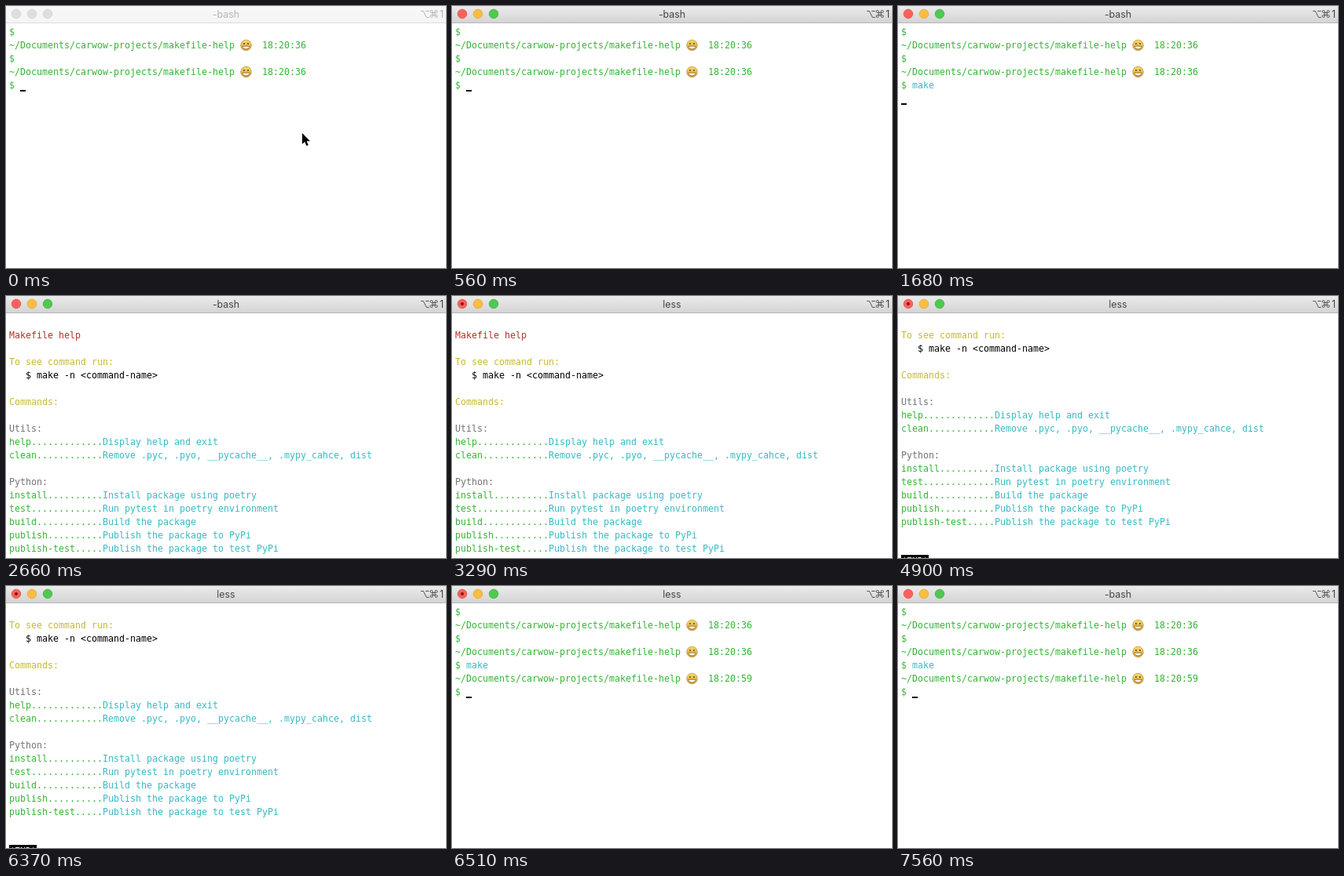
An HTML page with a canvas that plays this animation: 560x334 px, repeating every 7630 ms.

```html
<!DOCTYPE html>
<html>
<head>
<meta charset="utf-8">
<style>
  html, body { margin: 0; width: 100%; height: 100%; overflow: hidden; background: #fff; }
  canvas { display: block; width: 560px; height: 334px; }
</style>
</head>
<body>
<canvas id="stage"></canvas>
<script>
const W = 560, H = 334, LOOP = 7630, CELL = 7, ROW = 17;
const GREEN = '#35b535', CYAN = '#38bac4', YELLOW = '#c6ba35', RED = '#ab3526', GRAY = '#747474';
const MONO = '11.63px "DejaVu Sans Mono", monospace';
const UI = '12.4px Inter, sans-serif';

// Event times in ms
const ACTIVE = 70, POINTER_OFF = 140, KEYS = [910, 980, 1120, 1190], ENTER = 1540,
  PAGER = 2660, TITLE_ON = 3220, SCROLLS = [4340, 4760], QUIT = 6440, TITLE_OFF = 6860;

const PAGE = [
  [], ['Makefile help', RED], [],
  ['To see command run:', YELLOW], ['   $ make -n <command-name>', '#000'], [],
  ['Commands:', YELLOW], [],
  ['Utils:', GRAY],
  ['help', GREEN, 'Display help and exit'],
  ['clean', GREEN, 'Remove .pyc, .pyo, __pycache__, .mypy_cahce, dist'], [],
  ['Python:', GRAY],
  ['install', GREEN, 'Install package using poetry'],
  ['test', GREEN, 'Run pytest in poetry environment'],
  ['build', GREEN, 'Build the package'],
  ['publish', GREEN, 'Publish the package to PyPi'],
  ['publish-test', GREEN, 'Publish the package to test PyPi']
];

const canvas = document.getElementById('stage');
const ratio = window.devicePixelRatio || 1;
canvas.width = W * ratio;
canvas.height = H * ratio;
const c = canvas.getContext('2d');
c.scale(ratio, ratio);

const passed = (times, t) => times.filter(x => t >= x).length;

function rect(x, y, w, h, color) {
  c.fillStyle = color;
  c.fillRect(x, y, w, h);
}

function disc(x, y, r, fill, edge) {
  c.beginPath();
  c.arc(x, y, r, 0, 2 * Math.PI);
  c.fillStyle = fill;
  c.fill();
  if (edge) {
    c.strokeStyle = edge;
    c.lineWidth = 0.7;
    c.stroke();
  }
}

function write(text, col, row, color) {
  c.font = MONO;
  c.textAlign = 'left';
  c.fillStyle = color;
  c.fillText(text, 4 + col * CELL, 37 + row * ROW);
}

function caret(col, row) {
  rect(4 + col * CELL, 39 + row * ROW, CELL, 2, '#000');
}

function face(x, y) {
  const skin = c.createLinearGradient(0, y - 7, 0, y + 7);
  skin.addColorStop(0, '#f7dc68');
  skin.addColorStop(1, '#dba036');
  disc(x, y, 6.8, skin, '#b98a3c');
  disc(x - 2.5, y - 2, 1, '#5b431c');
  disc(x + 2.5, y - 2, 1, '#5b431c');
  c.beginPath();
  c.ellipse(x, y + 1.2, 4.6, 3.7, 0, 0, Math.PI);
  c.closePath();
  c.fillStyle = '#fff';
  c.fill();
  c.strokeStyle = '#80602c';
  c.lineWidth = 0.8;
  c.stroke();
}

function prompt(row, time) {
  write('~/Documents/carwow-projects/makefile-help', 0, row, GREEN);
  face(305.5, 50 + (row - 1) * ROW);
  write(time, 46, row, GREEN);
}

function shell(t) {
  for (const row of [0, 2, 4]) write('$', 0, row, GREEN);
  prompt(1, '18:20:36');
  prompt(3, '18:20:36');
  const typed = passed(KEYS, t);
  write('make'.slice(0, typed), 2, 4, CYAN);
  if (t >= QUIT) {
    prompt(5, '18:20:59');
    write('$', 0, 6, GREEN);
    caret(2, 6);
  } else if (t >= ENTER) caret(0, 5);
  else caret(2 + typed, 4);
}

function pager(t) {
  const top = passed(SCROLLS, t);
  PAGE.slice(top).forEach(([text, color, note], row) => {
    if (!text) return;
    write(note ? text.padEnd(17, '.') : text, 0, row, color);
    if (note) write(note, 17, row, CYAN);
  });
  if (top === 2) {
    rect(4, 330, 5 * CELL, 4, '#000');
    c.font = MONO;
    c.fillStyle = '#fff';
    c.fillText('(END)', 4, 342);
  }
}

function shortcut(color) {
  c.strokeStyle = color;
  c.lineWidth = 1;
  // Option key
  c.stroke(new Path2D('M528 6.5h3.2l4 8h3.3M534 6.5h4.5'));
  // Command key
  c.stroke(new Path2D('M543 8.5h3v3h-3zM543 8.5h-1.5a1.5 1.5 0 1 1 1.5-1.5zM546 8.5v-1.5a1.5 1.5 0 1 1 1.5 1.5z' +
    'M546 11.5h1.5a1.5 1.5 0 1 1-1.5 1.5zM543 11.5v1.5a1.5 1.5 0 1 1-1.5-1.5z'));
  c.textAlign = 'right';
  c.fillText('1', 557, 14.5);
}

function titleBar(t) {
  const active = t >= ACTIVE, busy = t >= TITLE_ON && t < TITLE_OFF;
  const bar = c.createLinearGradient(0, 0, 0, 21);
  bar.addColorStop(0, active ? '#ebebeb' : '#f7f7f7');
  bar.addColorStop(1, active ? '#d4d4d4' : '#f5f5f5');
  rect(0, 0, W, 21, bar);
  rect(0, 21, W, 1, active ? '#b6b6b6' : '#dadada');
  const lights = [['#fb615b', '#dd4a43'], ['#fcbd41', '#dfa032'], ['#4fc950', '#38ac3c']];
  lights.forEach(([fill, edge], i) =>
    disc(13 + 20 * i, 10, 5.8, active ? fill : '#dedede', active ? edge : '#d0d0d0'));
  if (busy) disc(13, 10, 2, '#7d1510');
  c.font = UI;
  c.textAlign = 'center';
  c.fillStyle = active ? '#444' : '#b5b5b5';
  c.fillText(busy ? 'less' : '-bash', 280, 14.5);
  shortcut(active ? '#555' : '#b5b5b5');
}

function pointer() {
  const arrow = new Path2D('M377 162v14l3.2-3 2.2 5.2 2.4-1-2.2-5h4.4z');
  c.strokeStyle = '#fff';
  c.lineWidth = 2;
  c.stroke(arrow);
  c.fillStyle = '#000';
  c.fill(arrow);
}

function draw(now) {
  const t = now % LOOP;
  rect(0, 0, W, H, '#fff');
  if (t >= PAGER && t < QUIT) pager(t);
  else shell(t);
  titleBar(t);
  if (t < POINTER_OFF) pointer();
}

let start;
function tick(now) {
  start ??= now;
  draw(now - start);
  requestAnimationFrame(tick);
}
requestAnimationFrame(tick);
</script>
</body>
</html>
```
